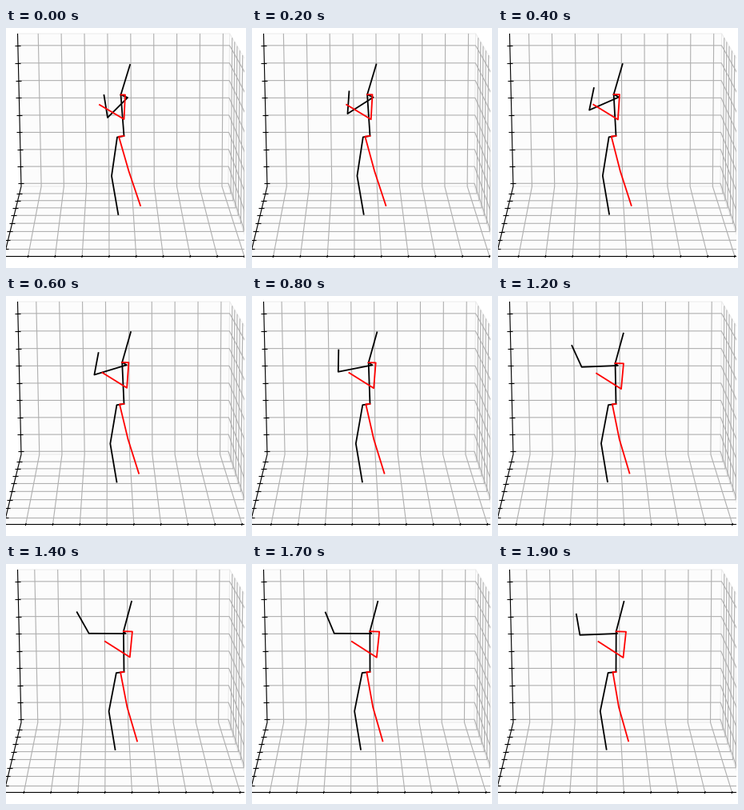
A matplotlib script for the animation above (2 s loop, 300x300 px).

```python
import numpy as np
import matplotlib.pyplot as plt
from matplotlib.animation import FuncAnimation
from matplotlib.collections import LineCollection

SIZE, DPI = 300, 100
FRAMES, STEP = 20, 100
GRID, PANE, EDGE = "#b0b0b0", "#fcfcfc", "#ebebeb"
CELL, COLUMN = 0.113, 0.109

# Homogeneous frame of the room: origin at the back left floor corner
ORIGIN = np.array([19, 198, 1.0])
ACROSS = np.array([259, 0, 0.0])
DEPTH = 0.8355 * np.array([-2.5, 285.5, 1]) - ORIGIN
UP = 0.977 * np.array([14.5, 7, 1]) - ORIGIN

# Joint: start and end of its travel over one loop
JOINTS = {
    "head": ((155, 46), (157.4, 47)),
    "neck": ((143.5, 83.5), (147.7, 84.3)),
    "hips": ((147.5, 135), (147.5, 135)),
    "hip": ((139, 136.5), (137.6, 136)),
    "knee": ((132, 185), (127.8, 184)),
    "foot": ((140.3, 233), (135.6, 231.7)),
    "shoulder": ((152, 87), (149, 87)),
    "red_shoulder": ((149, 83.5), (160, 84.7)),
    "red_elbow": ((147.5, 114), (156.5, 117)),
    "red_hand": ((117, 96), (125.5, 97)),
    "red_hip": ((141, 135.7), (143.5, 135)),
    "red_knee": ((153.5, 179), (151, 179)),
    "red_foot": ((168, 222), (163, 221.3)),
}
LIMBS = [
    ("black", ["head", "neck", "hips", "hip", "knee", "foot"]),
    ("black", ["neck", "shoulder", "elbow", "hand"]),
    ("red", ["neck", "red_shoulder", "red_elbow", "red_hand"]),
    ("red", ["hips", "red_hip", "red_knee", "red_foot"]),
]


def pose_at(t):
    """Joint positions t seconds into the loop."""
    s = t / 1.9
    ease = s + 0.1 * np.sin(np.pi * s)
    bob = 2 * np.sin(np.pi * min(t / 1.2, 1))
    pose = {}
    for name, (start, end) in JOINTS.items():
        x, y = np.array(start) + ease * np.subtract(end, start)
        pose[name] = x, y - bob * max(0, 1 - y / 140)

    # The raised arm: the elbow settles outward while the forearm swings
    x = 101.5 + 25.5 * np.exp(-t / 0.57)
    y = 86 + 26 * abs(1 - t / 1.55) ** 1.5
    pose["elbow"] = x, y
    pose["hand"] = x - 4.5 + 10.5 * np.sin(2 * np.pi * s), y - 28 + 2 * s
    return pose


def project(u, d, h):
    x, y, w = ORIGIN + u * ACROSS + d * DEPTH + h * UP
    return x / w, y / w


def path(*points):
    return [project(*p) for p in points]


def room_lines(t):
    """Grid and tick segments; the room slides slowly left."""
    drift = -0.0175 * np.sin(np.pi * t / 3.4)
    columns = 0.097 + drift + COLUMN * np.arange(9)
    rows = 0.12 - 0.2 * drift + CELL * np.arange(8)
    levels = 0.02 + CELL * np.arange(9)
    lines = [path((u, 1, 0), (u, 0, 0), (u, 0, 1)) for u in columns]
    lines += [path((0, d, 0), (1, d, 0), (1, d, 1)) for d in rows]
    lines += [path((0, 0, h), (1, 0, h), (1, 1, h)) for h in levels]

    front = [project(u, 1, 0) for u in columns]
    sides = [project(0, d, 0) for d in rows] + [project(0, 0, h) for h in levels]
    ticks = [[(x + 0.4, y - 1.5), (x - 0.4, y + 1.5)] for x, y in front]
    ticks += [[(x - 4, y), (x + 3, y)] for x, y in sides]
    return lines, ticks


fig = plt.figure(figsize=(SIZE / DPI, SIZE / DPI), dpi=DPI, facecolor="white")
ax = fig.add_axes([0, 0, 298 / SIZE, 1])
ax.set(xlim=(0, 298), ylim=(SIZE, 0))
ax.axis("off")

for face in (
    [(0, 0, 0), (1, 0, 0), (1, 0, 1), (0, 0, 1)],
    [(0, 0, 0), (1, 0, 0), (1, 1, 0), (0, 1, 0)],
    [(1, 0, 0), (1, 1, 0), (1, 1, 1), (1, 0, 1)],
):
    ax.fill(*zip(*path(*face)), fc=PANE, ec=EDGE, lw=0.7)

grid = ax.add_collection(LineCollection([], colors=GRID, linewidths=0.8))
tick_marks = ax.add_collection(LineCollection([], colors="black", linewidths=0.8))
ax.add_collection(LineCollection(
    [path((0, 0, 1), (0, 0, 0), (0, 1, 0), (1, 1, 0))],
    colors="black", linewidths=0.8))
limbs = [ax.plot([], [], color=c, lw=1.3, solid_joinstyle="round")[0]
         for c, _ in LIMBS]


def draw(frame):
    t = frame * STEP / 1000
    lines, ticks = room_lines(t)
    grid.set_segments(lines)
    tick_marks.set_segments(ticks)
    pose = pose_at(t)
    for line, (_, chain) in zip(limbs, LIMBS):
        line.set_data(*zip(*(pose[name] for name in chain)))
    return [grid, tick_marks, *limbs]


anim = FuncAnimation(fig, draw, frames=FRAMES, interval=STEP,
                     repeat=True, repeat_delay=0, blit=False)
plt.show()
```
